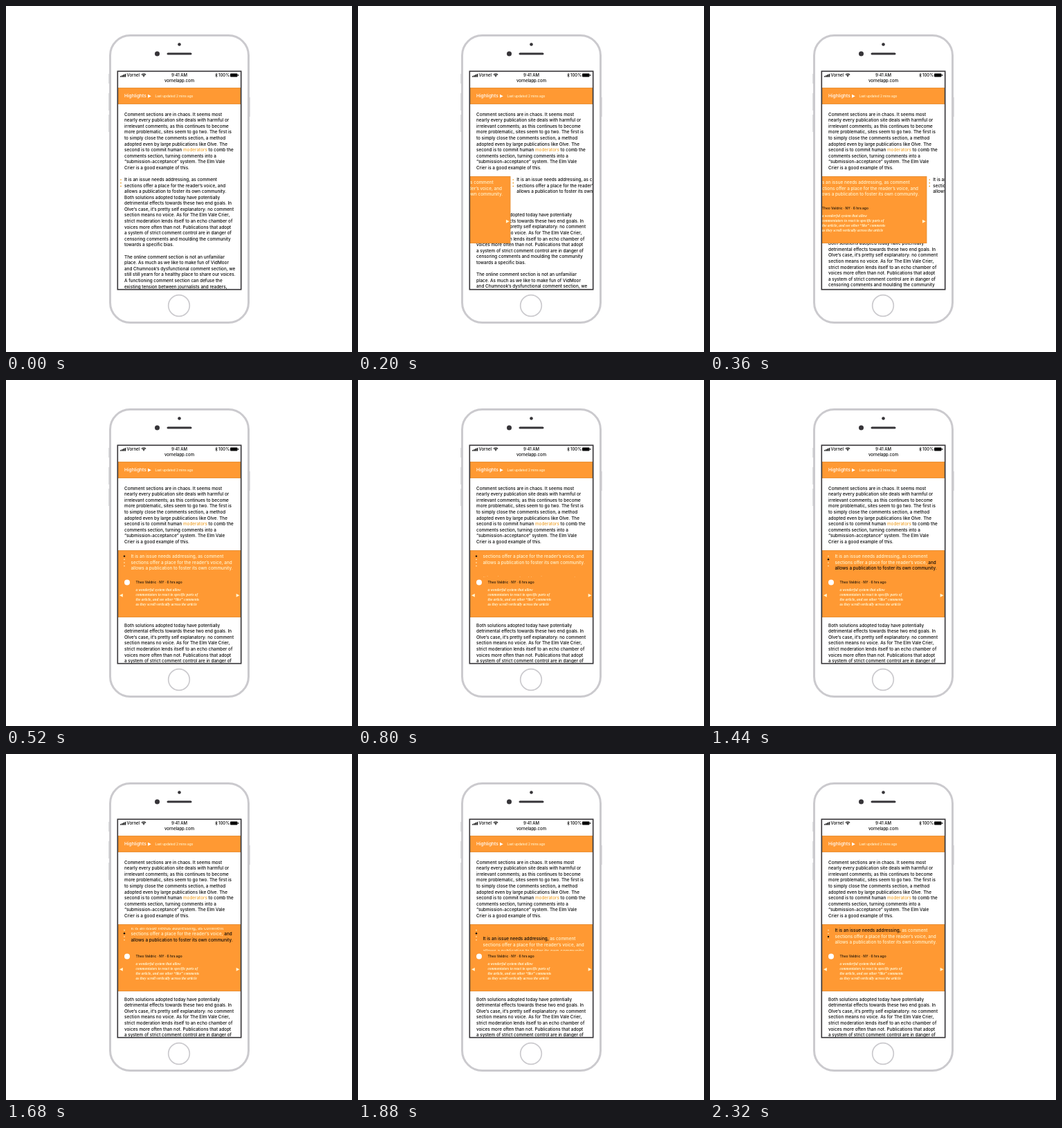
Animation of 500 by 500 pixels, one loop 2360 ms. Source, as an HTML page with a canvas:

```html
<!DOCTYPE html>
<html lang="en">
<head>
<meta charset="utf-8">
<title>Article highlights</title>
<style>
html, body { margin: 0; width: 100%; height: 100%; overflow: hidden; background: #fff; }
canvas { display: block; width: 500px; height: 500px; }
</style>
</head>
<body>
<canvas id="stage" width="500" height="500"></canvas>
<script>
const ctx = document.getElementById('stage').getContext('2d');
const LOOP = 2360, STEP = 40, SLIDE = 493;
const SCROLL_STARTS = [640, 1580];
const SCREEN = { x: 162, y: 95, w: 177, h: 314 };
const PANEL = { y: 246, w: 177, h: 97 };
const LINE = 8.6, PAGE = 40, GAP = 78;
const ORANGE = '#ff9933', EDGE = '#d98c3d', CREAM = '#fff6d2', INK = '#080808';
const LINK = '#eba02c', DARK = '#363438', SHELL = '#cbcace';
const SANS = 'Inter, Arial, sans-serif';
const BODY = '500 6.35px ' + SANS;
const STATUS = '500 6px ' + SANS;
const REPLY_FONT = 'italic 600 5.3px "Liberation Serif", "Times New Roman", serif';

const INTRO = [
  'Comment sections are in chaos. It seems most',
  'nearly every publication site deals with harmful or',
  'irrelevant comments; as this continues to become',
  'more problematic, sites seem to go two. The first is',
  'to simply close the comments section, a method',
  'adopted even by large publications like Olve. The',
  ['second is to commit human ', 'moderators', ' to comb the'],
  'comments section, turning comments into a',
  '“submission-acceptance” system. The Elm Vale',
  'Crier is a good example of this.'
];
const QUOTE = [
  ['It is an issue needs addressing,', ' as comment'],
  ['sections offer a place for the reader’s voice,', ' and'],
  ['allows a publication to foster its own community.']
];
const REST = [
  'Both solutions adopted today have potentially',
  'detrimental effects towards these two end goals. In',
  'Olve’s case, it’s pretty self explanatory: no comment',
  'section means no voice. As for The Elm Vale Crier,',
  'strict moderation lends itself to an echo chamber of',
  'voices more often than not. Publications that adopt',
  'a system of strict comment control are in danger of',
  'censoring comments and moulding the community',
  'towards a specific bias.',
  '',
  'The online comment section is not an unfamiliar',
  'place. As much as we like to make fun of VidMoor',
  'and Chumnook’s dysfunctional comment section, we',
  'still still yearn for a healthy place to share our voices.',
  'A functioning comment section can defuse the',
  'existing tension between journalists and readers,'
];
const REPLY = [
  'a wonderful system that allow',
  'commentators to react to specific parts of',
  'the article, and see other “like” comments',
  'as they scroll vertically across the article'
];
// Whether the run at [line][part] is inked on each quote page.
const MARKED = [
  () => false,
  (line, part) => line === 2 || (line === 1 && part === 1),
  (line, part) => line === 0 && part === 0
];

function ease(x) {
  x = Math.min(1, Math.max(0, x));
  return x < 0.5 ? 2 * x * x : 1 - 2 * (1 - x) ** 2;
}

function text(str, x, y, font, color, align = 'left') {
  ctx.font = font;
  ctx.fillStyle = color;
  ctx.textAlign = align;
  ctx.fillText(str, x, y);
}

function runs(parts, x, y, font, colorOf) {
  parts.forEach((part, i) => {
    text(part, x, y, font, colorOf(i));
    x += ctx.measureText(part).width;
  });
}

function rect(x, y, w, h, color) {
  ctx.fillStyle = color;
  ctx.fillRect(x, y, w, h);
}

function band(x, y, w, h) {
  rect(x, y, w, h, ORANGE);
  ctx.strokeStyle = EDGE;
  ctx.lineWidth = 0.6;
  ctx.strokeRect(x + 0.3, y + 0.3, w - 0.6, h - 0.6);
}

function disc(x, y, r, color) {
  ctx.fillStyle = color;
  ctx.beginPath();
  ctx.arc(x, y, r, 0, Math.PI * 2);
  ctx.fill();
}

function arrow(x, y, dir, color) {
  ctx.fillStyle = color;
  ctx.beginPath();
  ctx.moveTo(x - 2.3 * dir, y - 2.5);
  ctx.lineTo(x + 2.5 * dir, y);
  ctx.lineTo(x - 2.3 * dir, y + 2.5);
  ctx.fill();
}

function clipped(x, y, w, h, draw) {
  ctx.save();
  ctx.beginPath();
  ctx.rect(x, y, w, h);
  ctx.clip();
  draw();
  ctx.restore();
}

function drawPhone() {
  ctx.strokeStyle = SHELL;
  ctx.lineWidth = 3;
  ctx.beginPath();
  ctx.roundRect(150.5, 42.5, 200, 415, 29);
  ctx.stroke();
  [[148.4, 98, 14], [148.4, 126, 25], [148.4, 157, 25], [351.6, 132, 28]]
    .forEach(([x, y, h]) => rect(x, y, 1, h, SHELL));
  ctx.lineWidth = 1.7;
  ctx.beginPath();
  ctx.arc(250, 433, 15.3, 0, Math.PI * 2);
  ctx.stroke();
  disc(250.5, 55.5, 2.3, DARK);
  disc(218.5, 69, 3.5, DARK);
  ctx.fillStyle = DARK;
  ctx.beginPath();
  ctx.roundRect(232.5, 67.4, 36, 3.2, 1.6);
  ctx.fill();
}

function drawStatus() {
  for (let i = 0; i < 4; i++) rect(165 + i * 2.2, 101.2 - i, 1.6, 1.4 + i, INK);
  text('Vornel', 174.5, 100.2, STATUS, INK);
  ctx.strokeStyle = INK;
  ctx.lineWidth = 1.2;
  [2, 4].forEach(r => {
    ctx.beginPath();
    ctx.arc(199, 102, r, -Math.PI * 0.78, -Math.PI * 0.22);
    ctx.stroke();
  });
  disc(199, 101.8, 0.8, INK);
  text('9:41 AM', 250.5, 100.2, STATUS, INK, 'center');
  text('vornelapp.com', 250.5, 108.4, STATUS, INK, 'center');

  ctx.lineWidth = 0.7;
  ctx.beginPath();
  [[302.5, 98.6], [305.3, 101.4], [303.9, 102.7], [303.9, 97.3], [305.3, 98.6], [302.5, 101.4]]
    .forEach(([x, y]) => ctx.lineTo(x, y));
  ctx.stroke();
  text('100%', 307, 100.2, STATUS, INK);
  ctx.fillStyle = INK;
  ctx.beginPath();
  ctx.roundRect(324, 97.6, 10.5, 4.8, 1);
  ctx.fill();
  rect(335, 99, 1, 2, INK);
}

function drawHeader() {
  band(162, 118, 177, 24);
  text('Highlights', 171, 130, '500 6.6px ' + SANS, '#fff');
  arrow(207.3, 130.3, 1, '#fff');
  text('Last updated 2 mins ago', 215.5, 130.4, '500 4.7px ' + SANS, CREAM);
}

function drawArticle(open) {
  INTRO.forEach((line, i) =>
    runs([].concat(line), 171, 156.6 + i * LINE, BODY, part => part === 1 ? LINK : INK));

  const shift = PANEL.w * open;
  QUOTE.forEach((line, i) =>
    runs(line, 171 + shift, 251 + i * LINE, BODY, () => INK));
  for (let i = 0; i < 3; i++) disc(166 + shift, 251 + i * 4.7, 0.85, LINK);

  REST.forEach((line, i) =>
    text(line, 171, 276.7 + GAP * open + i * LINE, BODY, INK));
}

function drawQuote(page, offset) {
  QUOTE.forEach((line, i) =>
    runs(line, 180.5, 255.2 + offset + i * LINE, BODY,
      part => MARKED[page](i, part) ? INK : CREAM));
}

function drawPanel(open, scrolls) {
  ctx.save();
  ctx.translate(-PANEL.w * (1 - open), 0);
  band(162, PANEL.y, PANEL.w, PANEL.h);

  const position = scrolls.reduce((sum, s) => sum + s, 0);
  clipped(162, 251, PANEL.w, 33.5, () =>
    MARKED.forEach((_, page) => drawQuote(page, (page - position) * PAGE)));

  const active = scrolls.filter(s => s === 1).length;
  for (let i = 0; i < 4; i++) {
    const on = i === active;
    disc(171, 254.6 + i * 4.7, on ? 1.2 : 0.8, on ? INK : CREAM);
  }

  disc(175, 292.6, 4, '#fff');
  text('Theo Valdric · NY · 6 hrs ago', 187.5, 292.4, '600 4.9px ' + SANS, '#33210c');
  REPLY.forEach((line, i) =>
    text(line, 187.5, 303.6 + i * 7, REPLY_FONT, CREAM));
  arrow(166.5, 311.3, -1, CREAM);
  arrow(335, 311.3, 1, CREAM);
  ctx.restore();
}

function draw(t) {
  const open = ease(t / SLIDE);
  const scrolls = SCROLL_STARTS.map(start => ease((t - start) / SLIDE));
  rect(0, 0, 500, 500, '#fff');
  ctx.textBaseline = 'middle';
  drawPhone();
  clipped(SCREEN.x, SCREEN.y, SCREEN.w, SCREEN.h, () => {
    drawStatus();
    drawHeader();
    drawArticle(open);
    drawPanel(open, scrolls);
  });
  ctx.strokeStyle = DARK;
  ctx.lineWidth = 1.6;
  ctx.strokeRect(161.3, 94.3, 178.4, 315.4);
}

const begin = performance.now();
function tick() {
  const t = (performance.now() - begin) % LOOP;
  draw(Math.floor(t / STEP) * STEP);
  requestAnimationFrame(tick);
}
tick();
</script>
</body>
</html>
```
